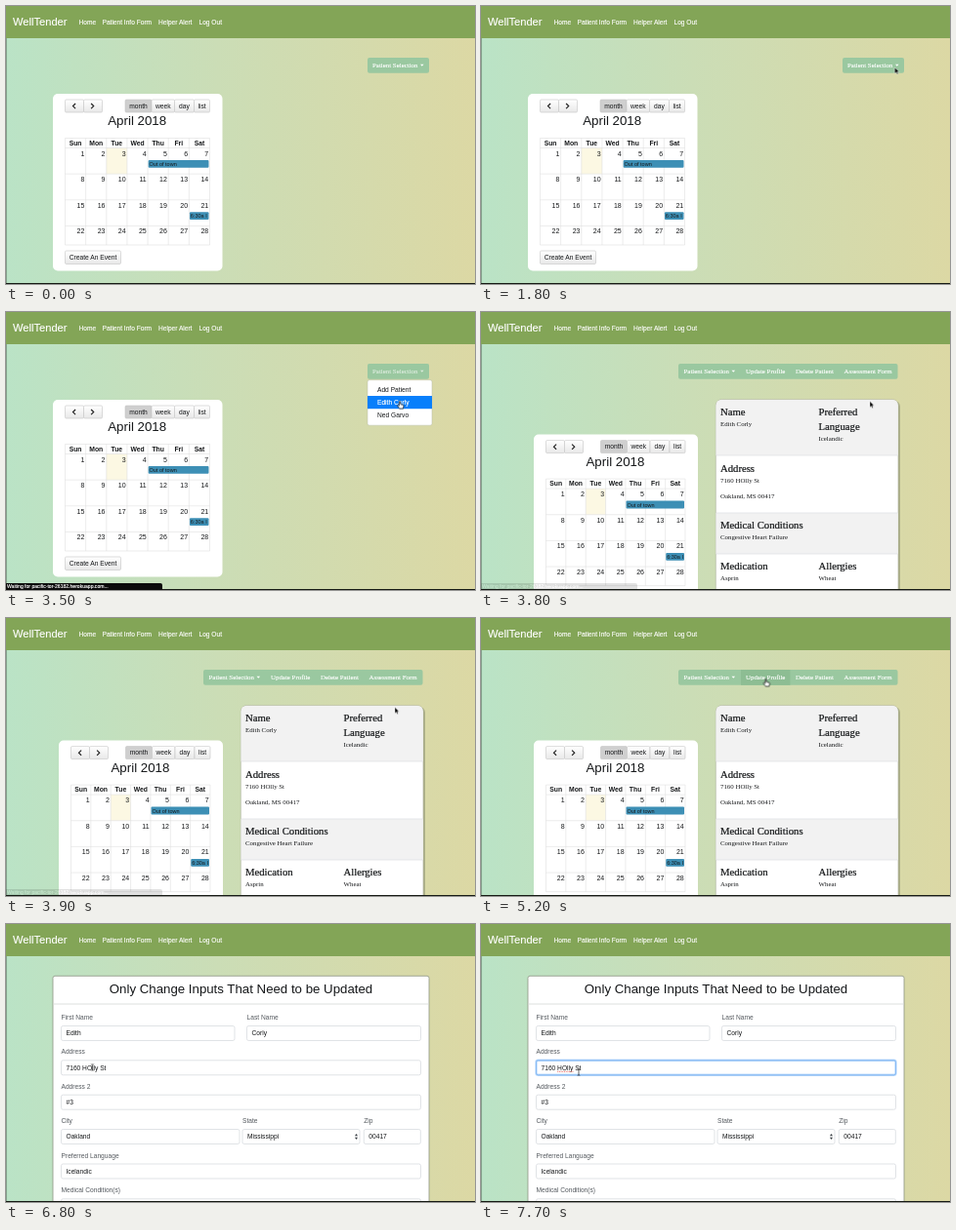
Recreate the animation shown at these times as an HTML page. Size 480x285 px, loop 8 s.

```html
<!DOCTYPE html>
<html lang="en">
<head>
<meta charset="utf-8">
<title>Patient calendar</title>
<style>
html, body { margin: 0; width: 100%; height: 100%; overflow: hidden; background: #cddcb5; }
svg { display: block; width: 480px; height: 285px; }
text { font-family: "Liberation Sans", Arial, sans-serif; fill: #16181a; white-space: pre; }
.serif { font-family: "Liberation Serif", "Times New Roman", serif; }
.head { stroke: #16181a; stroke-width: .22px; }
.white { fill: #fff; stroke: #fff; stroke-width: .14px; }
.label { fill: #54595e; }
.bold { font-weight: bold; }
.end { text-anchor: middle; text-anchor: end; }
.mid { text-anchor: middle; }

/* hard cuts: every layer shares one 8 s clock */
.cut { animation: 8s step-end infinite; }
.home { animation-name: home; }
.profile { animation-name: profile; }
.form { animation-name: form; }
.menu { animation-name: menu; }
.hover { animation-name: hover; }
.picked { animation-name: picked; }
.link { animation-name: link; }
.status { animation-name: status; }
.over { animation-name: over; }
.focus { animation-name: focus; }
.arrow { animation-name: arrow; }
.hand { animation-name: hand; }
.beam { animation-name: beam; }
.pointer { animation: move 8s ease-in-out infinite; }

@keyframes home { 0% { opacity: 1 } 47.5%, 100% { opacity: 0 } }
@keyframes profile { 0% { opacity: 0 } 47.5% { opacity: 1 } 66.25%, 100% { opacity: 0 } }
@keyframes form { 0% { opacity: 0 } 66.25%, 100% { opacity: 1 } }
@keyframes menu { 0% { opacity: 0 } 26.25%, 100% { opacity: 1 } }
@keyframes hover { 0% { opacity: 0 } 32.5%, 100% { opacity: 1 } }
@keyframes picked { 0% { opacity: 0 } 42.5%, 100% { opacity: 1 } }
@keyframes link { 0% { opacity: 0 } 36.25% { opacity: 1 } 42.5%, 100% { opacity: 0 } }
@keyframes status { 0% { opacity: 0 } 42.5% { opacity: 1 } 47.5% { opacity: .12 } 50%, 100% { opacity: 0 } }
@keyframes over { 0% { opacity: 0 } 62.5%, 100% { opacity: 1 } }
@keyframes focus { 0% { opacity: 0 } 87.5%, 100% { opacity: 1 } }
@keyframes arrow { 0% { opacity: 1 } 30% { opacity: 0 } 47.5% { opacity: 1 } 62.5% { opacity: 0 } 68.75% { opacity: 1 } 71.25%, 100% { opacity: 0 } }
@keyframes hand { 0% { opacity: 0 } 30% { opacity: 1 } 47.5% { opacity: 0 } 62.5% { opacity: 1 } 68.75%, 100% { opacity: 0 } }
@keyframes beam { 0% { opacity: 0 } 71.25%, 100% { opacity: 1 } }
@keyframes move {
  0%, 11.25% { transform: translate(490px, 150px) }
  21.25%, 26.25% { transform: translate(423.5px, 63px) }
  33.75% { transform: translate(405px, 92px) }
  40%, 45% { transform: translate(403px, 91.5px) }
  47.5%, 56.25% { transform: translate(398px, 91.5px) }
  63.75%, 68.75% { transform: translate(291.5px, 62.5px) }
  72.5%, 80% { transform: translate(86px, 143px) }
  84%, 91.25% { transform: translate(88.5px, 147px) }
  96.25%, 100% { transform: translate(100px, 152px) }
}
</style>
</head>
<body>
<svg id="stage" viewBox="0 0 480 285"></svg>
<script>
const text = (x, y, s, size, cls = '') =>
  `<text x="${x}" y="${y}" font-size="${size}" class="${cls}">${s}</text>`;
const box = (x, y, w, h, fill, more = '') =>
  `<rect x="${x}" y="${y}" width="${w}" height="${h}" fill="${fill}" ${more}/>`;
const path = (d, stroke, width, more = '') =>
  `<path d="${d}" fill="none" stroke="${stroke}" stroke-width="${width}" ${more}/>`;
const layer = (name, ...parts) => `<g class="cut ${name}">${parts.join('')}</g>`;
const serif = (x, y, s) => text(x, y, s, 6.87, 'serif');
const head = (x, y, s) => text(x, y, s, 10.7, 'serif head');
const white = (x, y, s) => text(x, y, s, 6.9, 'serif white');
const caret = (x, y) => `<path d="M${x} ${y}h3.6l-1.8 1.9z" fill="#fff"/>`;

const first = 'Edith', last = 'Corly', street = '7160 HOlly St', zip = '00417';
const mint = '#9ac8a0';

function button(x, y, w, h, label, on) {
  return box(x, y, w, h, on ? '#cfcfcf' : 'url(#soft)', 'stroke="#c4c4c4" stroke-width=".6" rx="1.2"') +
    text(x + w / 2, y + h / 2 + 2.3, label, 6.7, 'mid');
}

// x0..x1 is the inner width, top the upper edge of the toolbar
function calendar(x0, x1, top) {
  const col = (x1 - x0) / 7, grid = top + 39.5, body = top + 49.5, row = 26.65;
  const bottom = top + 149;
  const colX = i => x0 + i * col;
  let out = button(x0, top, 19, 13, '') + button(x0 + 19, top, 19, 13, '');
  out += path(`M${x0 + 10.6} ${top + 4}l-2.6 2.6 2.6 2.6M${x0 + 26.6} ${top + 4}l2.6 2.6-2.6 2.6`, '#222', 1.2);
  let x = x1 - 86.5;
  [['month', 27], ['week', 23.5], ['day', 20], ['list', 16]].forEach(([name, w], i) => {
    out += button(x, top, w, 13, name, i === 0);
    x += w;
  });
  out += text((x0 + x1) / 2 - .3, top + 26.3, 'April 2018', 13.3, 'mid');
  out += box(colX(2), body, col, row, '#fcf8e3');

  let lines = `M${x0} ${grid}H${x1}V${bottom}H${x0}Z`;
  for (let r = 0; r < 4; r++) lines += `M${x0} ${body + r * row}H${x1}`;
  for (let c = 1; c < 7; c++) lines += `M${colX(c)} ${grid}V${bottom}`;
  out += path(lines, '#dfdfdf', .6);

  ['Sun', 'Mon', 'Tue', 'Wed', 'Thu', 'Fri', 'Sat'].forEach((d, c) => {
    out += text(colX(c + .5), top + 46.6, d, 6.8, 'bold mid');
  });
  for (let d = 0; d < 28; d++) {
    out += text(colX(d % 7 + 1) - 1.3, top + 57.5 + Math.floor(d / 7) * row, d + 1, 7, 'end');
  }
  const event = (c, y, label) =>
    box(colX(c) + .6, y, x1 - colX(c) - 1.6, 7.8, '#3d8fb5', 'rx="1"') + text(colX(c) + 1.5, y + 5.9, label, 5.5);
  out += event(4, top + 62, 'Out of town') + event(6, top + 115.3, '6:30a I');
  return out + button(x0, top + 155, 57, 13.5, 'Create An Event');
}

function field(x, y, w, label, value) {
  return text(x, y - 6.4, label, 6.65, 'label') +
    box(x, y, w, 15, '#fff', 'stroke="#d3d7db" stroke-width=".7" rx="1.8"') +
    text(x + 5, y + 9.8, value, 6.65);
}

const defs = `<defs>
  <linearGradient id="page"><stop stop-color="#bae3c6"/><stop offset=".45" stop-color="#cbddb6"/><stop offset="1" stop-color="#dcd8a4"/></linearGradient>
  <linearGradient id="soft" x2="0" y2="1"><stop stop-color="#fff"/><stop offset="1" stop-color="#e8e8e8"/></linearGradient>
</defs>`;

const nav = box(0, 0, 480, 33, '#83a557') + text(7, 20, 'WellTender', 11.15, 'white') +
  [[74.5, 'Home'], [98.5, 'Patient Info Form'], [156, 'Helper Alert'], [197.5, 'Log Out']]
    .map(([x, s]) => text(x, 18.5, s, 6.6, 'white')).join('');

const home = layer('home',
  box(48, 90, 173.5, 181.5, '#fff', 'rx="5"'), calendar(60.5, 208.5, 96),
  box(370, 53, 63, 15.8, mint, 'rx="2"'), white(375, 63, 'Patient Selection'), caret(424, 59.8),
  layer('menu',
    box(370, 53, 63, 15.8, mint, 'rx="2" opacity=".35"'),
    box(370, 69.7, 66, 46.5, '#fff', 'rx="2" stroke="#b9bfa8" stroke-width=".5"'),
    layer('hover', box(370.3, 86, 65.4, 13.2, '#f4f5f6')),
    text(380, 82, 'Add Patient', 6.65), text(380, 95, `${first} ${last}`, 6.65), text(380, 108, 'Ned Garvo', 6.65),
    layer('picked', box(370, 86, 66, 13.2, '#087ffb'), text(380, 95, `${first} ${last}`, 6.65, 'white'))));

const profile = layer('profile',
  box(54, 125.5, 168, 165, '#fff', 'rx="5"'), calendar(66.5, 209, 131.6),
  box(202, 53, 224.5, 15.8, mint, 'rx="2"'),
  layer('over', box(266, 53, 50.5, 15.8, '#8dbd93')),
  white(207.5, 63, 'Patient Selection'), caret(256.5, 59.8),
  white(271, 63, 'Update Profile'), white(322, 63, 'Delete Patient'), white(371.5, 63, 'Assessment Form'),
  box(241.5, 91, 187.5, 210, '#5d6550', 'rx="6" opacity=".35"'),
  box(240.3, 89.7, 186.7, 210, '#fff', 'rx="6" stroke="#a9ad9c" stroke-width=".6"'),
  '<path d="M240.6 147V96q0-6 6-6h174q6 0 6 6v51z" fill="#f2f2f2"/>',
  box(240.6, 206, 186, 42, '#f2f2f2'),
  path('M240.6 147h186m-186 59h186m-186 42h186', '#dcdfe2', .7),
  head(245, 106, 'Name'), serif(245, 117, `${first} ${last}`),
  head(345.5, 106, 'Preferred'), head(345.5, 121.4, 'Language'), serif(345.5, 132, 'Icelandic'),
  head(245, 163.5, 'Address'), serif(245, 174.5, street), serif(245, 191, `Oakland, MS ${zip}`),
  head(245, 222, 'Medical Conditions'), serif(245, 233.3, 'Congestive Heart Failure'),
  head(245, 264, 'Medication'), serif(245, 275, 'Asprin'),
  head(345.5, 264, 'Allergies'), serif(345.5, 275, 'Wheat'));

const form = layer('form',
  box(48, 53.3, 385, 250, '#fff', 'rx="2" stroke="#8f9585" stroke-width=".8"'),
  path('M48.4 82h384.2', '#d5d8d6', .8),
  text(240.5, 71, 'Only Change Inputs That Need to be Updated', 13.25, 'mid'),
  field(56.5, 104.5, 177.5, 'First Name', first), field(246.5, 104.5, 178, 'Last Name', last),
  field(56.5, 139.8, 368, 'Address', street), field(56.5, 175.2, 368, 'Address 2', '#3'),
  field(56.5, 210.5, 182.5, 'City', 'Oakland'), field(242, 210.5, 120, 'State', 'Mississippi'),
  '<path d="M357 217.3l1.5-2.2 1.5 2.2zm0 1.4l1.5 2.2 1.5-2.2z" fill="#343a40"/>',
  field(366.3, 210.5, 58, 'Zip', zip),
  field(56.5, 246, 368, 'Preferred Language', 'Icelandic'), field(56.5, 281.8, 368, 'Medical Condition(s)', ''),
  layer('focus',
    box(56.5, 139.8, 368, 15, 'none', 'rx="2" stroke="#007bff" stroke-opacity=".25" stroke-width="2.4"'),
    box(56.5, 139.8, 368, 15, 'none', 'rx="1.8" stroke="#7fb8f7" stroke-width=".8"'),
    path('M78.2 151.3h16.2', '#e0443c', .8, 'stroke-dasharray="1 .7"')));

const bar = (name, s) => layer(name, '<path d="M0 278h158q2 0 2 2v5H0z" fill="#0b0b0b"/>', text(1, 283.3, s, 5.07, 'white'));
const site = 'pacific-tor-26182.herokuapp.com';

const edge = box(0, 33, .7, 252, '#3c4a3c', 'opacity=".6"') + box(0, 284, 480, 1, '#161a14');

const pointer = `<g class="pointer">` +
  layer('arrow', '<path d="M0 0V6.2L1.4 4.9 2.4 7 3.4 6.5 2.5 4.6H4.4Z" fill="#000" stroke="#fff" stroke-width=".45"/>') +
  layer('hand', '<path d="M-.6.4q.7-.8 1.3 0V3l2.6.7q.8.3.7 1.2L3.4 7.6H-.2L-2.4 4.6q0-1 .9-.7l.9.6z" fill="#fff" stroke="#111" stroke-width=".7"/>') +
  layer('beam', path('M-1.3-3.3q1.3 0 1.3.8V2.5q0 .8-1.3.8M1.3-3.3Q0-3.3 0-2.5M0 2.5q0 .8 1.3.8', '#222', .7)) +
  '</g>';

document.getElementById('stage').innerHTML = defs + box(0, 0, 480, 285, 'url(#page)') + nav +
  home + profile + form + edge + bar('link', site) + bar('status', `Waiting for ${site}...`) + pointer;
</script>
</body>
</html>
```
